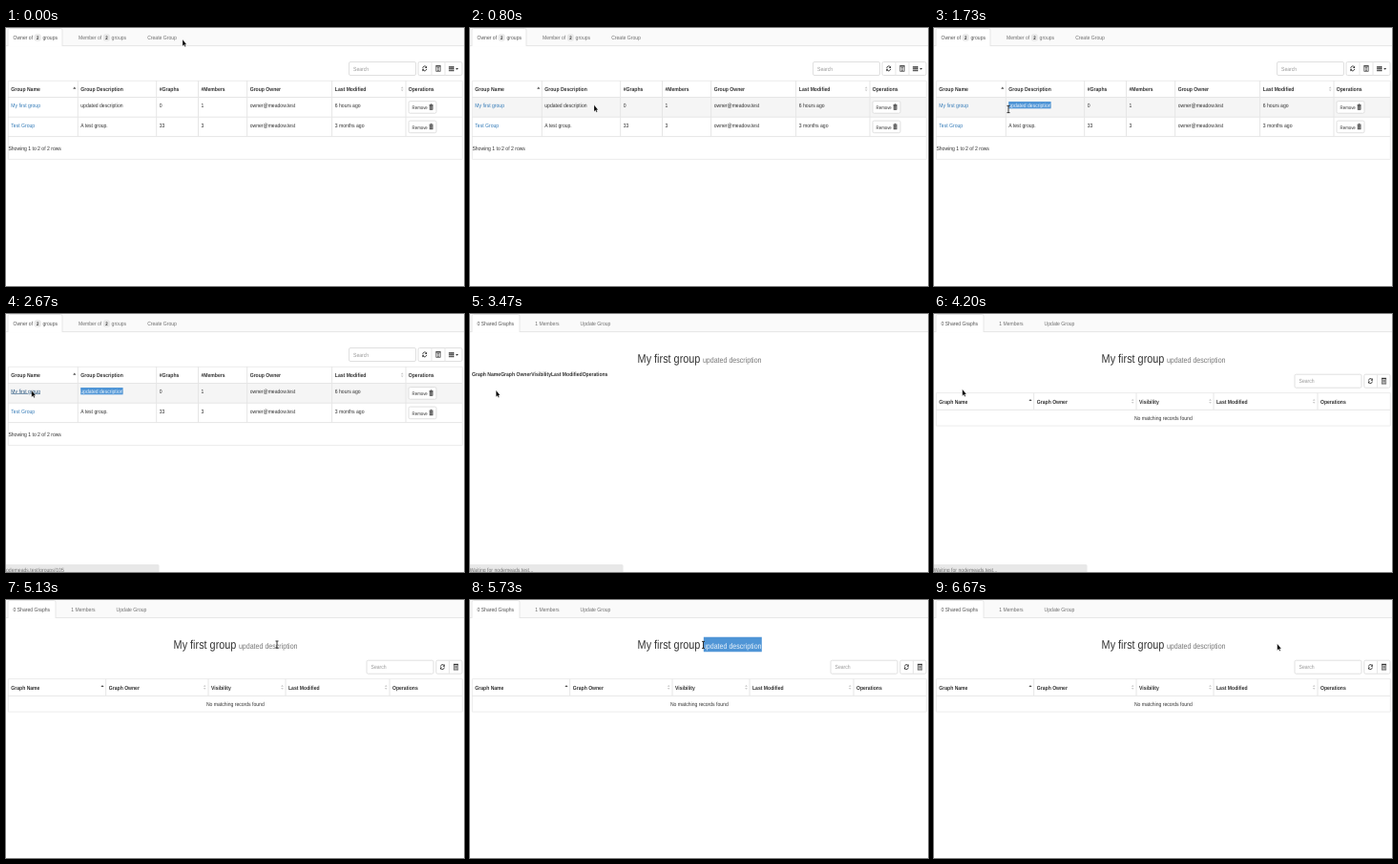
Recreate the animation shown at these times as an HTML page. Size 480x270 px, loop 7.39 s.

```html
<!DOCTYPE html>
<html lang="en">
<head>
<meta charset="utf-8">
<title>Group table</title>
<style>
  html, body { margin: 0; width: 100%; height: 100%; overflow: hidden; background: #fff; }
  svg { display: block; width: 100vw; height: 100vh; }
  text { font-family: "Liberation Sans", Arial, sans-serif; text-rendering: geometricPrecision; white-space: pre; }
</style>
</head>
<body>
<svg id="stage" viewBox="0 0 480 270"></svg>
<script>
const LOOP = 7390, FPS = 15;
const LINE = '#e6e6e6', EDGE = '#ececec', DARK = '#333', MUTED = '#707070', BLUE = '#4f95d6';

// The page is shown squeezed, so all text shares one scale.
const text = (x, y, s, { size = 14, fill = DARK, bold = false, anchor = 'start', attrs = '' } = {}) =>
  `<text transform="translate(${x} ${y}) scale(.362 .427)" font-size="${size}" fill="${fill}"
    font-weight="${bold ? 700 : 400}" text-anchor="${anchor}" ${attrs}>${s}</text>`;
const head = (x, y, s) => text(x, y, s, { bold: true });
const rect = (x, y, w, h, fill, more = '') =>
  `<rect x="${x}" y="${y}" width="${w}" height="${h}" fill="${fill}" ${more}/>`;
const box = (x, y, w, h) => rect(x, y, w, h, '#fff', 'stroke="#d8d8d8" stroke-width=".8" rx="1.5"');
const path = (d, stroke = LINE, width = 1, more = '') =>
  `<path d="${d}" fill="none" stroke="${stroke}" stroke-width="${width}" ${more}/>`;
const at = (x, y, s) => `<g transform="translate(${x} ${y})">${s}</g>`;

const refresh = (x, y) => at(x, y,
  path('M-2 -.5A2.1 2.5 0 0 1 1.6 -1.7M2 .5A2.1 2.5 0 0 1 -1.6 1.7', DARK, .9) +
  `<path d="M2.4 -3V-.4H.3ZM-2.4 3V.4H-.3Z" fill="${DARK}"/>`);
const list = (x, y) => at(x, y,
  rect(-2.2, -3, 4.4, 6, 'none', `stroke="${DARK}" stroke-width=".6"`) +
  path('M-2.2 -2.5H2.2', DARK, 1.2) + path('M-1.4 -.8H1.4M-1.4 .6H1.4M-1.4 2H1.4', DARK, .7));
const grid = (x, y) => at(x, y,
  path('M-2.6 -1.9H2.6M-2.6 0H2.6M-2.6 1.9H2.6', DARK, 1.5, 'stroke-dasharray="1.5 .35"') +
  `<path d="M4.4 -.7H7.4L5.9 1.1Z" fill="${DARK}"/>`);
const trash = (x, y) => at(x, y,
  path('M-2 -2H2M-.7 -2.8H.7', DARK, .8) +
  rect(-1.5, -1.2, 3, 4, '#999', `stroke="${DARK}" stroke-width=".6"`) + path('M0 -1V2.6', DARK, .5));
const sortUp = (x, y) => `<path d="M${x - 1.6} ${y + .9}h3.2l-1.6 -2.1z" fill="#555"/>`;
const sortBoth = (x, y) =>
  `<path d="M${x - 1.4} ${y - .6}h2.8l-1.4 -1.9zM${x - 1.4} ${y + .6}h2.8l-1.4 1.9z" fill="#ccc"/>`;

const nav = right =>
  rect(0, 0, 480, 19, '#fafafa') + path('M0 18.6H480') +
  `<path d="M2 19.4V2Q2 .5 3.5 .5H${right - 1.5}Q${right} .5 ${right} 2V19.4" fill="#fff"/>` +
  path(`M2 19V2Q2 .5 3.5 .5H${right - 1.5}Q${right} .5 ${right} 2V19`);
const tab = (x, s, fill = MUTED) => text(x, 11.8, s, { fill });
const badge = x => rect(x - 3.5, 6.2, 7, 7.6, '#e8e8e8', 'rx="2.5"') +
  text(x, 11.9, '2', { size: 12, bold: true, anchor: 'middle' });
const search = (x, y) => box(x, y, 70, 14) + text(x + 4.5, y + 9.2, 'Search', { fill: '#999' });

const groupRow = (y, name, about, graphs, members, age, id) =>
  text(5.3, y, name, { fill: '#337ab7', attrs: id ? `id="${id}"` : '' }) +
  [[78.3, about], [160.8, graphs], [204.5, members], [255.7, 'owner@meadow.test'], [344.8, age]]
    .map(([x, s]) => text(x, y, s)).join('') +
  box(422, y - 6.4, 29, 12.6) + text(425.6, y + 2, 'Remove', { size: 12 }) + trash(445.6, y - .4);

const groupsPage =
  nav(59) +
  tab(7.5, 'Owner of', '#555') + badge(33.2) + tab(38.5, 'groups', '#555') +
  tab(76, 'Member of') + badge(105.4) + tab(110.6, 'groups') + tab(148.2, 'Create Group') +
  search(359.5, 35.5) + box(432, 35.5, 46, 14) + path('M446 35.5V49.5M460 35.5V49.5') +
  refresh(438.7, 42.4) + list(453, 42.4) + grid(466.8, 42.6) +
  rect(2.5, 73, 475.5, 20, '#f5f5f5', 'id="hover"') +
  path('M2.3 55.3H478.3V137.4H2.3Z', EDGE) + path('M2 72.5H478M2 93.2H478M2 113.6H478') +
  path([75.3, 157.7, 201.5, 252.7, 341.6, 419].map(x => `M${x} 55V113.5`).join('')) +
  [[5.3, 'Group Name'], [78.3, 'Group Description'], [160.8, '#Graphs'], [204.5, '#Members'],
   [255.7, 'Group Owner'], [344.8, 'Last Modified'], [421.8, 'Operations']]
    .map(([x, s]) => head(x, 65.8, s)).join('') +
  sortUp(71.8, 62.8) + sortBoth(415.2, 63.8) +
  groupRow(83, 'My first group', 'updated description', '0', '1', '6 hours ago', 'link') +
  groupRow(103.5, 'Test Group', 'A test group.', '33', '3', '3 months ago') +
  text(2.4, 128.1, 'Showing 1 to 2 of 2 rows');

const groupPage =
  nav(52) + tab(7.5, '0 Shared Graphs', '#555') + tab(68.3, '1 Members') + tab(115.6, 'Update Group') +
  text(175.6, 51.4, 'My first group', { size: 30 }) +
  text(243.9, 51.4, 'updated description', { size: 19.5, fill: '#777' });

const rawTable = head(2, 65.2, 'Graph NameGraph OwnerVisibilityLast ModifiedOperations');

const graphTable =
  search(378, 63.2) + box(450.8, 63.2, 27.2, 14) + path('M464.5 63.2V77.2') +
  refresh(457.4, 70.1) + list(471.6, 70.1) +
  path('M2.3 82.6H478.3V117H2.3Z', EDGE) + path('M2 100.3H478') +
  path([104.7, 212, 293, 402].map(x => `M${x} 82.6V100`).join('')) +
  [[5.3, 'Graph Name'], [107.8, 'Graph Owner'], [215, 'Visibility'], [296, 'Last Modified'], [405, 'Operations']]
    .map(([x, s]) => head(x, 93.6, s)).join('') +
  sortUp(101, 90.2) + [208.2, 289.5, 398.2].map(x => sortBoth(x, 91.3)).join('') +
  text(240.3, 110.8, 'No matching records found', { anchor: 'middle' });

// A selection is a blue bar with pale text, both cut at the same edges.
const selection = (id, y, h, x, base, size) =>
  `<clipPath id="${id}Clip">${rect(x, y, 0, h, '#000', `id="${id}Edge"`)}</clipPath>
   <g id="${id}" clip-path="url(#${id}Clip)">${rect(x - 1, y, 70, h, BLUE)}${
     text(x, base, 'updated description', { size, fill: '#eaf3fb' })}</g>`;

const group = (id, s) => `<g id="${id}">${s}</g>`;
const $ = id => document.getElementById(id);

$('stage').innerHTML =
  group('groups', groupsPage + selection('cellSel', 77, 7.6, 78.3, 83, 14)) +
  group('detail', groupPage + group('raw', rawTable) + group('table', graphTable) +
    selection('titleSel', 38.5, 16, 243.9, 51.4, 19.5)) +
  group('status',
    `<path d="M0 262H159Q160.5 262 160.5 263.5V270H0Z" fill="#e8e8e8"/>` +
    group('url', text(-2.9, 269.6, 'nodemeads.test/groups/105', { size: 14.2, fill: MUTED })) +
    group('wait', text(-.3, 269.6, 'Waiting for nodemeads.test...', { size: 14.2, fill: MUTED }))) +
  group('arrow', '<path d="M0 0V7L1.5 5.6 2.5 7.8 3.5 7.3 2.6 5.2H4.3Z" fill="#000" stroke="#fff" stroke-width=".3"/>') +
  group('beam', path('M-1.5 -3.6H1.5M0 -3.6V3.6M-1.5 3.6H1.5', '#222', .9));

// Pointer stops: step, x, y, shape from there on.
const stops = [
  [0, 185, 12, 'arrow'], [3, 185, 12, 'arrow'], [12, 130, 80.5, 'arrow'], [14, 125, 82, 'beam'],
  [15, 124, 82, 'beam'], [21, 100, 88, 'beam'], [26, 78, 85, 'beam'], [27, 78, 85, 'arrow'],
  [31, 45, 84, 'arrow'], [33, 45, 84, 'arrow'], [40, 26.8, 80, 'arrow'], [51, 26.8, 80, 'arrow'],
  [55, 29.7, 78.7, 'arrow'], [63, 29.7, 78.7, 'arrow'],
  [70, 300, 47, 'beam'], [72, 312, 47, 'beam'], [76, 312, 47, 'beam'], [77, 284, 46.6, 'beam'],
  [86, 244.5, 47, 'beam'], [88, 244.5, 47, 'beam'], [89, 275, 46, 'arrow'], [91, 359, 45.6, 'arrow'],
  [93, 359, 45.6, 'arrow'], [94, 359.7, 45.7, 'arrow'], [111, 359.7, 45.7, 'arrow']
];

function pointer(step) {
  const i = Math.max(0, stops.findLastIndex(s => s[0] <= step));
  const a = stops[i], b = stops[i + 1] || a;
  const k = b === a ? 0 : (step - a[0]) / (b[0] - a[0]);
  const e = k * k * (3 - 2 * k);
  return { x: a[1] + (b[1] - a[1]) * e, y: a[2] + (b[2] - a[2]) * e, shape: a[3] };
}

const show = (id, on) => { $(id).style.display = on ? '' : 'none'; };

function select(id, on, from, min, max) {
  show(id, on);
  const left = Math.min(max, Math.max(min, from));
  $(id + 'Edge').setAttribute('x', left);
  $(id + 'Edge').setAttribute('width', max - left);
}

function draw(step) {
  const p = pointer(step), opened = step >= 52, onLink = step >= 36;
  show('groups', !opened);
  show('detail', opened);
  show('raw', step < 60);
  show('table', step >= 60);
  show('hover', p.y > 73);
  show('status', onLink && step < 66);
  show('url', step < 46);
  show('wait', step >= 46);
  $('link').setAttribute('fill', onLink ? '#23527c' : '#337ab7');
  $('link').setAttribute('text-decoration', onLink ? 'underline' : 'none');
  select('cellSel', step >= 16, pointer(Math.min(step, 26)).x, 78.2, 122.6);
  // The heading highlight trails the pointer by one step.
  select('titleSel', step >= 78 && step < 100, pointer(Math.min(step - 1, 86)).x - 1, 243.7, 305.8);
  for (const shape of ['arrow', 'beam']) show(shape, shape === p.shape);
  $(p.shape).setAttribute('transform', `translate(${p.x} ${p.y})`);
}

const start = performance.now();
function tick() {
  const t = (performance.now() - start) % LOOP;
  draw(Math.floor((t + 4) * FPS / 1000));
  requestAnimationFrame(tick);
}
tick();
</script>
</body>
</html>
```
